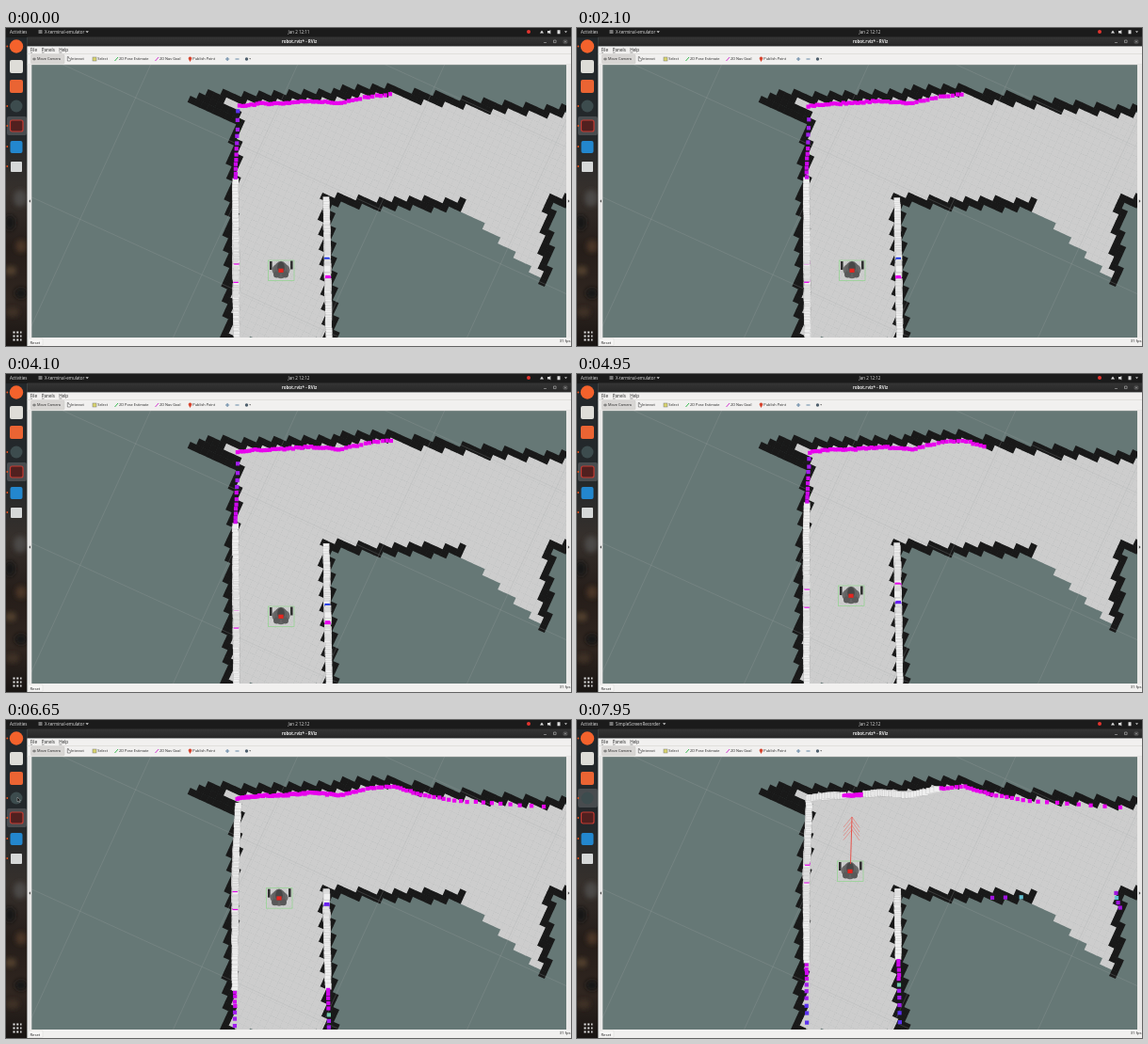
An HTML page with a canvas that plays this animation: 600 by 338 pixels, repeating every 8000 ms.

```html
<!DOCTYPE html>
<html lang="en">
<head>
<meta charset="utf-8">
<title>Robot map view</title>
<style>
html, body { margin: 0; width: 100%; height: 100%; overflow: hidden; background: #1b1b1b; }
canvas, svg { position: absolute; left: 0; top: 0; width: 600px; height: 338px; }
text { font-family: "Open Sans", "Noto Sans", sans-serif; }
.bar text { font-size: 4.5px; fill: #e4e4e4; }
.menu text { font-size: 4.6px; fill: #222; }
.tools text { font-size: 3.9px; fill: #222; }
.status text { font-size: 4.2px; fill: #222; }
.bold { font-weight: 700; }
</style>
</head>
<body>
<canvas id="view" width="600" height="338"></canvas>
<svg viewBox="0 0 600 338">
  <defs>
    <linearGradient id="wall" x2="0" y2="1">
      <stop offset="0" stop-color="#24282b"/><stop offset=".3" stop-color="#23282b"/>
      <stop offset=".5" stop-color="#36302c"/><stop offset=".68" stop-color="#251d19"/>
      <stop offset=".85" stop-color="#302620"/><stop offset="1" stop-color="#191513"/>
    </linearGradient>
    <linearGradient id="head" x2="0" y2="1">
      <stop offset="0" stop-color="#353535"/><stop offset="1" stop-color="#272727"/>
    </linearGradient>
    <filter id="soft"><feGaussianBlur stdDeviation="2.5"/></filter>
    <clipPath id="dockClip"><path d="M0 10h22.5v328H0z"/></clipPath>
  </defs>

  <g clip-path="url(#dockClip)">
    <path fill="url(#wall)" d="M0 10h23v328H0z"/>
    <g filter="url(#soft)">
      <ellipse cx="15" cy="181" rx="7" ry="9" fill="#4b4846"/>
      <ellipse cx="4" cy="207" rx="6" ry="8" fill="#171514"/>
      <ellipse cx="16" cy="232" rx="6" ry="7" fill="#493425"/>
      <ellipse cx="5" cy="258" rx="6" ry="5" fill="#51402f"/>
      <ellipse cx="16" cy="282" rx="7" ry="6" fill="#171312"/>
      <ellipse cx="7" cy="302" rx="7" ry="5" fill="#403025"/>
    </g>
    <rect id="focus" x="1" width="21" height="20" rx="2" fill="#fff" opacity=".17"/>
    <circle cx="11" cy="19.5" r="7.2" fill="#f4622c"/>
    <rect x="4" y="34" width="14" height="14" rx="2" fill="#deddd8"/>
    <rect x="4" y="55" width="14" height="14" rx="2" fill="#ea6433"/>
    <circle cx="11" cy="83" r="6.5" fill="#3d4c4e"/>
    <rect x="4.5" y="98" width="13.5" height="12" rx="2" fill="#51201f" stroke="#c33a32" stroke-width="1.2"/>
    <rect x="4.5" y="120" width="13" height="13" rx="2" fill="#2387ce"/>
    <rect x="5" y="142" width="12" height="11" rx="1" fill="#d6d8d8"/>
    <g fill="#e95420">
      <circle cx="1.3" cy="19.5" r=".9"/><circle cx="1.3" cy="83" r=".9"/>
      <circle cx="1.3" cy="104" r=".9"/><circle cx="1.3" cy="126" r=".9"/><circle cx="1.3" cy="147" r=".9"/>
    </g>
    <path d="M7.5 323.5h9M7.5 327.5h9M7.5 331.5h9" stroke="#e6e6e6" stroke-width="2" stroke-dasharray="2 1.8"/>
  </g>

  <g class="bar">
    <path fill="#1b1b1b" d="M0 0h600v10H0z"/>
    <path fill="url(#head)" d="M22.5 9.5H600v10H22.5z"/>
    <text x="4" y="5.9">Activities</text>
    <rect x="34.5" y="2" width="4" height="4" rx=".6" fill="#777"/>
    <text id="app" x="41" y="5.9"></text>
    <path id="caret" d="M0 3.2h3.4l-1.7 2.1z" fill="#ccc"/>
    <text id="clock" x="311" y="5.9" text-anchor="middle"></text>
    <circle cx="555" cy="4" r="2" fill="#e3342f"/>
    <path d="M567 5.5l2-3 2 3zM575 3h2l1.3-1v4.5L577 5.4h-2zM585.5 2.2h3v4h-3z" fill="#ddd"/>
    <path d="M593 3.2h3l-1.5 2z" fill="#bbb"/>
    <text class="bold" x="311.5" y="16" text-anchor="middle">robot.rviz* - RViz</text>
    <circle cx="594" cy="14.5" r="2.7" fill="#444"/>
    <path d="M571 15.5h3M581.5 13h2.6v2.6h-2.6zM593 13.5l2 2m0-2l-2 2" fill="none" stroke="#ccc" stroke-width=".5"/>
  </g>

  <g class="menu">
    <path fill="#f1f0ef" d="M22.5 19.5H600V39H22.5z"/>
    <text x="25.8" y="25.2">File</text><text x="37.8" y="25.2">Panels</text><text x="56.2" y="25.2">Help</text>
    <path d="M26 26.1h2M38 26.1h2.5M56.4 26.1h3" stroke="#333" stroke-width=".45"/>
  </g>
  <g class="tools">
    <path d="M22.5 27.5H600M22.5 38.8H600" stroke="#d5d3d1" stroke-width=".6"/>
    <rect x="26.5" y="28.3" width="35.5" height="9.4" rx="1" fill="#d8d6d4" stroke="#c2c0be" stroke-width=".4"/>
    <path d="M28 33h4m-2-1.5v3" stroke="#555" stroke-width=".8"/>
    <path d="M65.3 30.5v4.5h3v-2.5l-2-.5v-1.5z" fill="#fff" stroke="#333" stroke-width=".5"/>
    <rect x="92" y="31" width="4" height="4" fill="#d9d46d" stroke="#777" stroke-width=".5"/>
    <path d="M115.5 35l3.5-4" stroke="#36b950" stroke-width="1"/>
    <path d="M158.5 35l3.5-4" stroke="#d336d0" stroke-width="1"/>
    <path d="M195.5 36l-1.7-3a1.8 1.8 0 1 1 3.4 0z" fill="#d6452f"/>
    <text x="33" y="34.4">Move Camera</text><text x="69" y="34.4">Interact</text>
    <text x="97.3" y="34.4">Select</text><text x="120" y="34.4">2D Pose Estimate</text>
    <text x="163" y="34.4">2D Nav Goal</text><text x="198.3" y="34.4">Publish Point</text>
    <path d="M233 33h4.2m-2.1-2.1v4.2M243.5 33h4" stroke="#6788a6" stroke-width="1.1"/>
    <circle cx="255.5" cy="33" r="1.7" fill="#4e5f6d"/>
    <path d="M258.3 32.3h1.7l-.85 1.2z" fill="#333"/>
  </g>

  <path fill="#e9e8e7" d="M22.5 39H27.3v290h-4.8zM595 39h5v290h-5z"/>
  <path fill="#444" d="M26 182.3v3.4l-1.7-1.7zM596.8 182.3v3.4l1.7-1.7z"/>
  <g class="status">
    <path fill="#f1f0ef" d="M22.5 329H600v9H22.5z"/>
    <rect x="23.5" y="330" width="15.5" height="7.5" rx="1" fill="#f7f6f5" stroke="#d0cecc" stroke-width=".4"/>
    <text x="25.5" y="335.6">Reset</text>
    <text id="help" x="41" y="335.4"><tspan class="bold">Left-Click:</tspan> Rotate. <tspan class="bold">Middle-Click:</tspan> Move X/Y. <tspan class="bold">Right-Click:</tspan> Zoom. <tspan class="bold">Shift:</tspan> More options.</text>
    <text x="599.5" y="334.4" text-anchor="end">31 fps</text>
  </g>
  <path id="pointer" d="M0 0v5l1.2-1 .8 1.7.8-.4-.8-1.6h1.6z" fill="#111" stroke="#fff" stroke-width=".3"/>
</svg>

<script>
const LOOP = 8000, TILT = 24.5 * Math.PI / 180, CELL = 7.1;
const $ = id => document.getElementById(id);
const g = $('view').getContext('2d');

const wallLines = [
  [[200, 76], [222, 72], [250, 74], [320, 73], [412, 65], [430, 72], [510, 83], [592, 90]],
  [[204, 76], [241, 92]],
  [[247, 91], [241, 160], [239, 230], [236, 332]],
  [[340, 182], [400, 187], [485, 187]],
  [[340, 182], [342, 250], [345, 332]],
  [[598, 182], [577, 183], [575, 215], [571, 268]]
];
const floorShape = [[206, 80], [247, 76], [415, 66], [592, 95], [602, 92], [602, 178], [576, 184],
  [571, 268], [483, 190], [340, 188], [344, 332], [240, 332], [246, 97], [240, 97]];

const segments = lines => lines.flatMap(l => l.slice(1).map((p, i) => [...l[i], ...p]));

function distance(x, y, [ax, ay, bx, by]) {
  const dx = bx - ax, dy = by - ay;
  const k = Math.max(0, Math.min(1, ((x - ax) * dx + (y - ay) * dy) / (dx * dx + dy * dy)));
  return Math.hypot(x - ax - k * dx, y - ay - k * dy);
}

function inside(x, y, shape) {
  let hit = false;
  shape.forEach(([ax, ay], i) => {
    const [bx, by] = shape[(i + 1) % shape.length];
    if (ay > y !== by > y && x < ax + (bx - ax) * (y - ay) / (by - ay)) hit = !hit;
  });
  return hit;
}

// Occupancy grid: cells of a tilted lattice, drawn once.
function drawMap() {
  const map = document.createElement('canvas');
  map.width = 600; map.height = 338;
  const m = map.getContext('2d'), walls = segments(wallLines);
  const cos = Math.cos(TILT), sin = Math.sin(TILT);
  m.fillStyle = '#667876';
  m.fillRect(0, 0, 600, 338);
  m.translate(247, 80);
  m.rotate(TILT);
  for (let i = -50; i < 75; i++) for (let j = -50; j < 55; j++) {
    const u = (i + .5) * CELL, v = (j + .5) * CELL;
    const x = 247 + u * cos - v * sin, y = 80 + u * sin + v * cos;
    if (x < 15 || x > 610 || y < 30 || y > 345) continue;
    const wall = walls.some(s => distance(x, y, s) < 5);
    if (!wall && !inside(x, y, floorShape)) continue;
    m.fillStyle = wall ? '#191919' : '#cdcdcd';
    m.fillRect(u - CELL / 2 - .2, v - CELL / 2 - .2, CELL + .4, CELL + .4);
  }
  m.strokeStyle = 'rgba(160,165,165,.3)';
  m.lineWidth = .7;
  m.beginPath();
  for (let k = -4; k < 5; k++) {
    const d = k * CELL * 20 + 40;
    m.moveTo(d, -600); m.lineTo(d, 600);
    m.moveTo(-600, d); m.lineTo(600, d);
  }
  m.stroke();
  return map;
}
const map = drawMap();

function track(t, keys) {
  const i = keys.findIndex(k => k[0] > t);
  if (i < 0) return keys[keys.length - 1][1];
  if (!i) return keys[0][1];
  const [t0, a] = keys[i - 1], [t1, b] = keys[i];
  return a + (b - a) * (t - t0) / (t1 - t0);
}
const robotX = t => track(t, [[4150, 292], [4950, 291], [6050, 290], [7950, 290]]);
const robotY = t => track(t, [[4150, 257], [4950, 235], [6050, 205], [7300, 171], [7950, 160]]);

const noise = n => { const s = Math.sin(n * 12.9898) * 43758.5453; return s - Math.floor(s); };

function scanLines(t) {
  const lean = track(t, [[4150, 245], [6050, 242.5], [7950, 244]]);
  const tag = (kind, line) => segments([line]).map(s => ({ kind, s }));
  return [
    ...tag('top', [[241, 84], [268, 80.5], [295, 80], [322, 77.5], [356, 80], [385, 73], [410, 70.5], [440, 79], [480, 86], [595, 94]]),
    ...tag('left', [[246.5, 88], [243.5, 163], [lean, 332]]),
    ...tag('right', [[340, 182], [343, 332]]),
    ...tag('low', [[430, 189], [485, 188]]),
    ...tag('low', [[572, 183], [577, 202]])
  ];
}

function castRay(x, y, dx, dy, lines) {
  let best = null;
  for (const { kind, s: [ax, ay, bx, by] } of lines) {
    const ex = bx - ax, ey = by - ay, det = dx * ey - dy * ex;
    const r = ((ax - x) * ey - (ay - y) * ex) / det;
    const k = ((ax - x) * dy - (ay - y) * dx) / det;
    if (r > 0 && k >= 0 && k <= 1 && (!best || r < best.r))
      best = { kind, r, facing: Math.abs(det) / Math.hypot(ex, ey) };
  }
  return best;
}

function colourOf({ kind, r, facing }, x, y, ry, n) {
  const magenta = '#e800ee';
  if (kind === 'top') {
    const gap = x > 283 && x < (ry > 166 ? 288 : 306);
    return x < 300 + (171 - ry) * 7.5 && !gap ? 'white' : magenta;
  }
  if (kind === 'low') return n % 3 ? '#a014e0' : '#62bfd0';
  const off = y - ry;
  if (r < 109) {
    if (kind === 'left') return Math.abs(off + 8) < 1.2 || Math.abs(off - 11) < 1.2 ? magenta : 'white';
    if (Math.abs(off + 10) < 1.5) return ry > 250 ? '#2038e8' : magenta;
    if (off > 7 && off < 12) return ry > 250 ? magenta : '#6a20f0';
    return 'white';
  }
  if (kind === 'right' && n % 9 === 4) return '#6fc9a8';
  return facing < .31 ? '#5a30f0' : facing < .37 ? '#a21cf0' : '#cf08ee';
}

function drawScan(t, x, y) {
  const lines = scanLines(t), tick = Math.floor(t / 100);
  const swing = (noise(tick) - .5) * .006;
  g.lineWidth = .35;
  for (let n = 0; n < 360; n++) {
    const a = n * Math.PI / 180 + swing, dx = Math.cos(a), dy = Math.sin(a);
    const hit = castRay(x, y, dx, dy, lines);
    if (!hit || hit.r > 305) continue;
    const r = hit.r + (noise(n + tick * 7.3) - .5) * 1.6;
    const px = x + dx * r, py = y + dy * r;
    const colour = colourOf(hit, px, py, y, n), white = colour === 'white';
    const w = white ? 6.6 : hit.r < 109 ? 5.4 : 4.2, h = white ? 6.6 : hit.r < 109 ? 3.8 : 4.2;
    g.fillStyle = white ? '#efefef' : colour;
    g.fillRect(px - w / 2, py - h / 2, w, h);
    if (white) {
      g.strokeStyle = 'rgba(130,130,130,.45)';
      g.strokeRect(px - w / 2, py - h / 2, w, h);
    }
  }
}

function disc(x, y, rx, ry, fill) {
  g.fillStyle = fill;
  g.beginPath();
  g.ellipse(x, y, rx, ry, 0, 0, 7);
  g.fill();
}

function drawRobot(x, y) {
  g.save();
  g.translate(x, y);
  g.strokeStyle = '#8fd58c';
  g.lineWidth = .7;
  g.strokeRect(-13.5, -10, 27.5, 21.5);
  g.fillStyle = '#303030';
  g.fillRect(-12, -9, 2.6, 9);
  g.fillRect(10, -9.5, 2.6, 9);
  disc(0, 0, 9.6, 7, '#6b6b6b');
  disc(0, 0, 7, 9.2, '#626262');
  disc(-4.5, 5, 3.5, 3.5, '#595959');
  disc(4.5, 5, 3.5, 3.5, '#595959');
  disc(0, -2.5, 3.8, 6, '#474747');
  g.fillStyle = '#e52620';
  g.fillRect(-2.6, -1.3, 5.2, 4.2);
  g.restore();
}

function drawHeading(x, y) {
  g.strokeStyle = '#e8433c';
  g.lineWidth = .9;
  g.beginPath();
  g.moveTo(x + .5, y - 7);
  g.lineTo(x + 2, 103);
  g.stroke();
  g.strokeStyle = 'rgba(235,90,82,.8)';
  g.lineWidth = .6;
  g.beginPath();
  for (let k = 0; k < 4; k++) {
    const top = 103 + k * 4.5;
    g.moveTo(x - 7, top + 11);
    g.lineTo(x + 2, top);
    g.lineTo(x + 10, top + 11.5);
  }
  g.stroke();
}

function show(id, on) { $(id).style.display = on ? '' : 'none'; }
function setText(id, s) { if ($(id).textContent !== s) $(id).textContent = s; }

function drawChrome(t) {
  const recorder = t >= 6700;
  setText('clock', t < 450 ? 'Jan 2  12:11' : 'Jan 2  12:12');
  setText('app', recorder ? 'SimpleScreenRecorder' : 'X-terminal-emulator');
  $('caret').setAttribute('transform', `translate(${recorder ? 91 : 84.5} 0)`);
  $('focus').setAttribute('y', recorder ? 73 : 94);
  show('help', t >= 6000 && t < 6600);
  show('pointer', t >= 5900 && t < 6850);
  const px = track(t, [[5900, 600], [6100, 596], [6650, 12]]);
  const py = track(t, [[6100, 93], [6650, 82]]);
  $('pointer').setAttribute('transform', `translate(${px} ${py})`);
}

function frame() {
  const t = performance.now() % LOOP, x = robotX(t), y = robotY(t);
  g.drawImage(map, 0, 0);
  drawScan(t, x, y);
  drawRobot(x, y);
  if (t >= 7650) drawHeading(x, y);
  drawChrome(t);
  requestAnimationFrame(frame);
}
frame();
</script>
</body>
</html>
```
